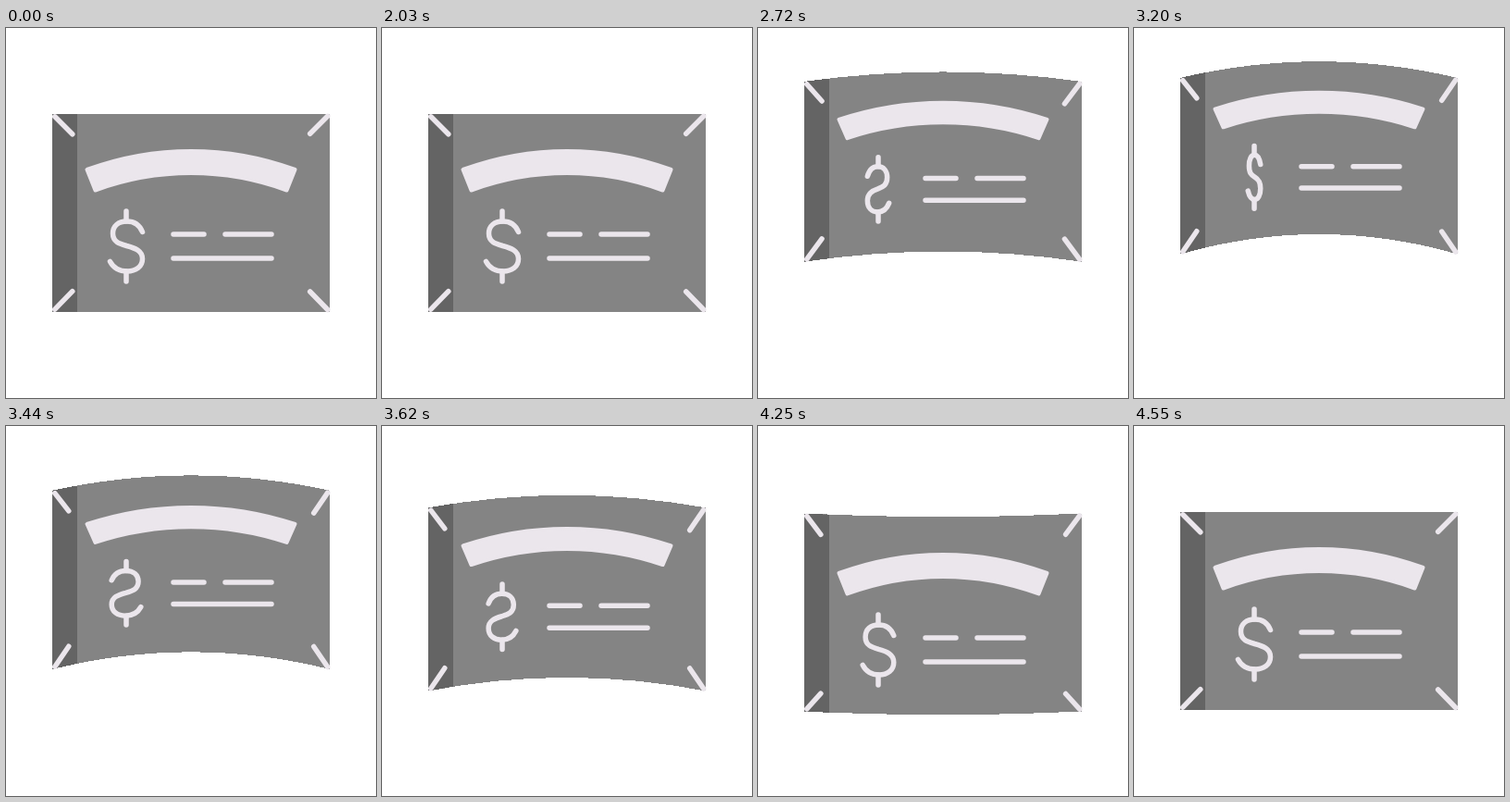
Animation of 400 by 400 pixels, one loop 4610 ms. Source, as an HTML page:

```html
<!DOCTYPE html>
<html lang="en">
<head>
<meta charset="utf-8">
<title>Waving note</title>
<style>
html, body { margin: 0; width: 100%; height: 100%; overflow: hidden; background: #fff; }
svg { display: block; width: 100%; height: 100%; }
.line { fill: none; stroke: #ebe6ec; stroke-width: 5.5; stroke-linecap: round; stroke-linejoin: round; }
.line path, path.line { vector-effect: non-scaling-stroke; }
</style>
</head>
<body>
<svg viewBox="0 0 400 400">
  <path id="card" fill="#848484" shape-rendering="crispEdges"/>
  <path id="strip" fill="#646464" shape-rendering="crispEdges"/>
  <path id="corners" class="line"/>
  <g id="content">
    <path fill="#ebe6ec" stroke="#ebe6ec" stroke-width="4" stroke-linejoin="round"
      d="M87.5 153A326 326 0 0 1 312.5 153L303.5 175.5A299 299 0 0 0 96.5 175.5Z"/>
    <g class="line">
      <path d="M181 223H214M237 223H287M181 249H287M130 198V209M130 263V274"/>
      <path id="ess" d="M147.500 220.500C144.500 213 138.500 209 130.500 209C121.500 209 115.500 214 115.500 222C115.500 231 122 233 130.500 235.500C140 238 147.500 241 147.500 249.500C147.500 258 140.500 263 131 263C122 263 116 259 112.500 252.500"/>
    </g>
  </g>
</svg>
<script>
(() => {
  const LOOP = 4610;
  const $ = id => document.getElementById(id);
  const card = $('card'), strip = $('strip'), corners = $('corners');
  const content = $('content'), ess = $('ess');

  // Cubic timing curve with end heights 0 and 1
  const bezier = (a, b) => x => {
    let lo = 0, hi = 1;
    for (let i = 0; i < 24; i++) {
      const s = (lo + hi) / 2, r = 1 - s;
      if (3 * r * r * s * a + 3 * r * s * s * b + s * s * s < x) lo = s;
      else hi = s;
    }
    return lo * lo * (3 - 2 * lo);
  };
  const soft = bezier(.364, .636);
  const quick = bezier(.167, .49);
  const late = bezier(.6, .8);
  const later = bezier(.85, .9);
  const turn = bezier(.167, .56);

  // Keys are [time, value, ease into this key]
  const track = (...keys) => t => {
    if (t <= keys[0][0]) return keys[0][1];
    for (let i = 1; i < keys.length; i++) {
      const [t0, v0] = keys[i - 1], [t1, v1, ease = soft] = keys[i];
      if (t < t1) return v0 + (v1 - v0) * ease((t - t0) / (t1 - t0));
    }
    return keys[keys.length - 1][1];
  };

  const START = 2030, PEAK = 3140, LOW = 4040, END = 4550;
  const wave = (rest, mid, peak, low) =>
    track([START, rest], [2600, mid], [PEAK, peak], [LOW, low, late], [END, rest, quick]);

  const height = track([START, 93], [PEAK, 33.2, quick], [LOW, 106.5], [END, 93, quick]);
  const squash = track([START, 1], [PEAK, .89, quick], [LOW, 1, late]);
  const cornerLag = track([START, 0], [PEAK, 20], [LOW, -9.8, later], [END, 0, quick]);
  const topLag = wave(0, 3.4, 2.2, -1.5);
  const baseLag = track([START, 0], [2650, 2.8], [PEAK, -1.7], [3620, 0], [LOW, -1.5], [END, 0, quick]);
  const spin = track([START, 0], [END, Math.PI * 4, turn]);

  // Reach of the corner marks
  const reach = track([START, 19], [PEAK, 15], [3620, 15], [LOW, 12.8], [END, 19]);
  const dropLeft = wave(19, 18.2, 19, 21);
  const dropRight = wave(19, 21.5, 22, 22);
  const rise = track([START, 19.5], [2720, 22], [3620, 22], [LOW, 15], [END, 19.5]);

  function draw(t) {
    const y = height(t), k = squash(t), lag = cornerLag(t);
    const base = y + 214 * k;
    const tc = y + lag, tm = y + topLag(t);
    const bc = base + lag, bm = base + baseLag(t);

    card.setAttribute('d',
      `M50 ${tc}Q200 ${2 * tm - tc} 350 ${tc}V${bc}Q200 ${2 * bm - bc} 50 ${bc}Z`);

    const edge = (c, m) => m + (c - m) * (123 / 150) ** 2;
    const tangent = (c, m) => c + (m - c) * 13.5 / 75;
    strip.setAttribute('d',
      `M50 ${tc}Q63.5 ${tangent(tc, tm)} 77 ${edge(tc, tm)}` +
      `V${edge(bc, bm)}Q63.5 ${tangent(bc, bm)} 50 ${bc}Z`);

    const r = reach(t), up = -rise(t);
    const mark = (x, cy, dx, dy) => `M${x} ${cy}l${dx} ${dy}`;
    corners.setAttribute('d',
      mark(52.8, tc + 2.8, r, dropLeft(t)) + mark(347.7, tc + 2.3, -r, dropRight(t)) +
      mark(52.8, bc - 2.8, r, up) + mark(347.7, bc - 2.5, -r, up));

    content.setAttribute('transform', `matrix(1 0 0 ${k} 0 ${y - 93 * k})`);
    let c = Math.cos(spin(t));
    if (Math.abs(c) < .01) c = .01;
    ess.setAttribute('transform', `matrix(${c} 0 0 1 ${130 * (1 - c)} 0)`);
  }

  const began = performance.now();
  function tick() {
    draw((performance.now() - began) % LOOP);
    requestAnimationFrame(tick);
  }
  tick();
})();
</script>
</body>
</html>
```
